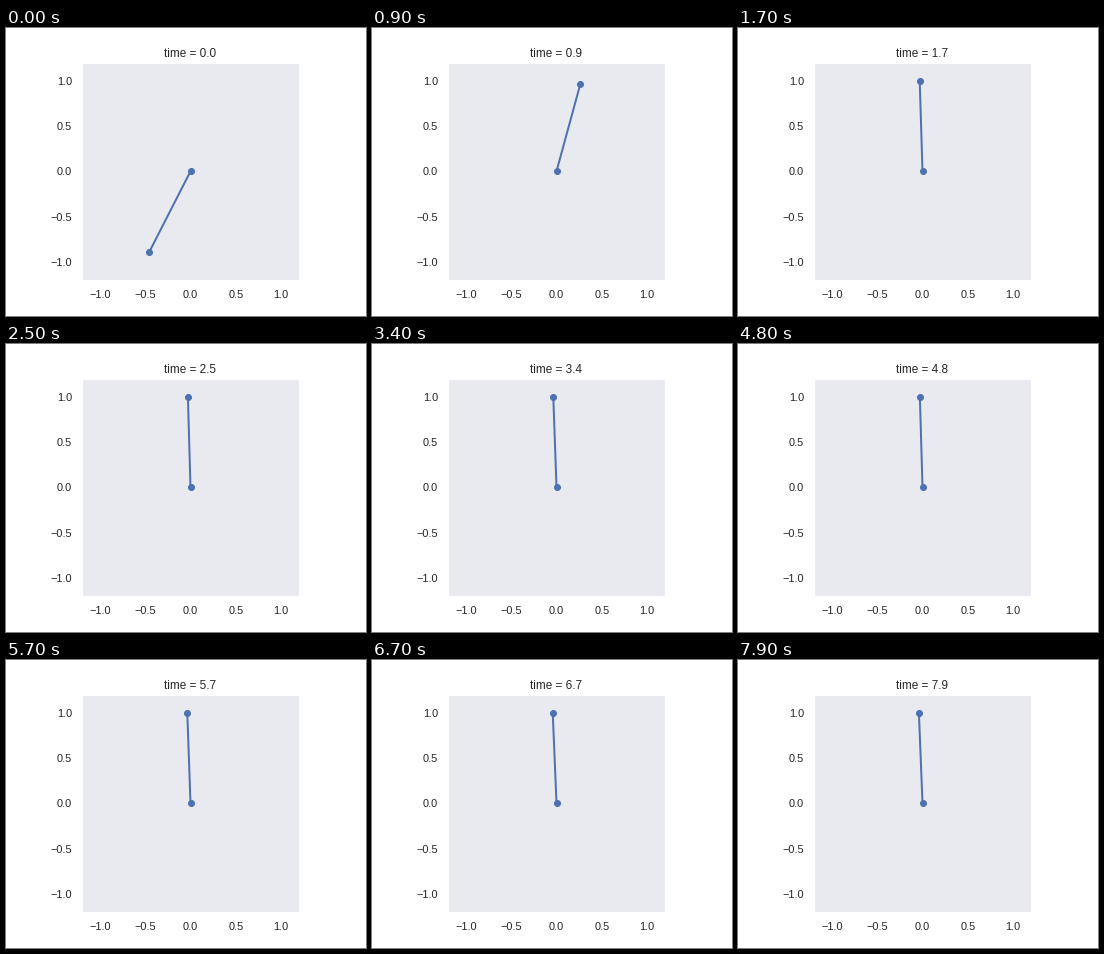
A matplotlib script for the animation above (8000 ms loop, 360x288 px).

```python
import numpy as np
import matplotlib.pyplot as plt
from matplotlib.animation import FuncAnimation

FRAMES, STEP = 80, 0.1
INK, BLUE, PANEL = "#262626", "#4C72B0", "#E9EAF0"

# Angles in radians, clockwise from upright; times in seconds
START, REST = 3.614, -0.037
SETTLE, SHARPNESS = 0.472, 1.4
SWAY, PERIOD, PEAK = 0.008, 1.15, 2.5

plt.rcParams.update({
    "font.family": "Liberation Sans",
    "text.color": INK,
    "axes.facecolor": PANEL,
    "axes.edgecolor": "white",
    "axes.linewidth": 1.25,
    "axes.titlesize": 11.8,
})


def angle(t):
    """Swing up from START, then sway gently around REST."""
    left = np.exp(-(t / SETTLE) ** SHARPNESS)
    sway = SWAY * np.cos(2 * np.pi * (t - PEAK) / PERIOD)
    return left * START + (1 - left) * (REST + sway)


fig, ax = plt.subplots(figsize=(5, 4), dpi=72, facecolor="white")
fig.subplots_adjust(left=0.125, right=0.9, bottom=0.125, top=0.88)
ax.set(xlim=(-1.2, 1.2), ylim=(-1.2, 1.2), aspect="equal")
ticks = np.arange(-1, 1.1, 0.5)
ax.set_xticks(ticks)
ax.set_yticks(ticks)
ax.tick_params(bottom=False, left=False, length=6, pad=3.5,
               labelsize=11, labelcolor=INK)

title = ax.set_title("time = 0.0", pad=6)
rod, = ax.plot([], [], "o-", color=BLUE, lw=2, markersize=6)


def update(i):
    t = i * STEP
    a = angle(t)
    rod.set_data([0, np.sin(a)], [0, np.cos(a)])
    title.set_text(f"time = {t:.1f}")
    return rod, title


anim = FuncAnimation(fig, update, frames=FRAMES, interval=100,
                     repeat=True, repeat_delay=0, blit=False)
plt.show()
```
